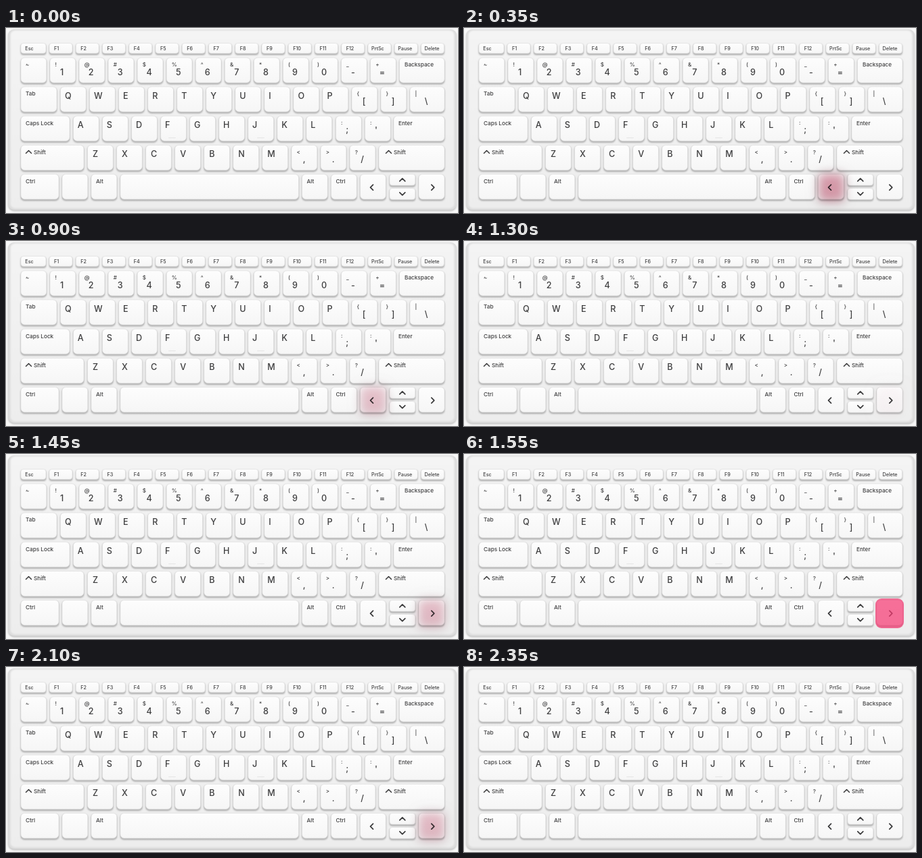
An HTML page for the animation above (2.55 s loop, 668 px wide and 274 px high).

```html
<!DOCTYPE html>
<html lang="en">
<head>
<meta charset="utf-8">
<title>Arrow keys</title>
<style>
  html, body { margin: 0; width: 100%; height: 100%; overflow: hidden; background: #f8f8f8; }
  #stage { position: relative; width: 668px; height: 274px; overflow: hidden; }
  svg { position: absolute; left: 0; top: 0; }
  text { font-family: Inter, "Open Sans", sans-serif; font-weight: 500; fill: #3e3e3f; }
  .chevron { fill: none; stroke: #3a3a3b; stroke-linecap: round; stroke-linejoin: round; }
  .glow, .press { position: absolute; opacity: 0; }
  .glow {
    top: 217px; width: 36px; height: 39px; border-radius: 6px; background: #a91e42;
    box-shadow: 0 0 7px 4px rgba(50, 45, 48, .4); filter: blur(7px); mix-blend-mode: multiply;
  }
  .press { top: 214px; width: 42px; height: 44px; border-radius: 9px; background: #f43a72; }
</style>
</head>
<body>
<div id="stage">
  <svg id="board" width="668" height="274" viewBox="0 0 668 274">
    <defs>
      <linearGradient id="body" x2="0" y2="1">
        <stop offset="0" stop-color="#f4f4f4"/>
        <stop offset="1" stop-color="#ededed"/>
      </linearGradient>
      <linearGradient id="cap" x2="0" y2="1">
        <stop offset="0" stop-color="#fdfdfd"/>
        <stop offset="1" stop-color="#f6f6f6"/>
      </linearGradient>
      <filter id="soft" x="-20%" y="-20%" width="140%" height="150%">
        <feGaussianBlur stdDeviation="0.9"/>
      </filter>
    </defs>
    <rect x="3" y="3" width="663" height="268.5" rx="9" fill="#c6c6c6" filter="url(#soft)"/>
    <rect x="3" y="2" width="663" height="267.5" rx="9" fill="#dcdcdc"/>
    <rect x="6.5" y="3.5" width="656" height="263.5" rx="7" fill="url(#body)" filter="url(#soft)"/>
  </svg>
</div>
<script>
const LOOP = 2550, STEP = 50, PITCH = 43.05, RIGHT = 648;
const stage = document.getElementById('stage');
const board = document.getElementById('board');

function draw(tag, attrs, label) {
  const el = document.createElementNS('http://www.w3.org/2000/svg', tag);
  for (const name in attrs) el.setAttribute(name, attrs[name]);
  if (label) el.textContent = label;
  board.append(el);
}

function cap(x, y, width, height = 37.5) {
  const rx = height < 25 ? 4 : 5.5;
  draw('rect', { x: x - .3, y: y + 1.2, width: width + .6, height: height + .7, rx, fill: '#a9a9a9', filter: 'url(#soft)' });
  draw('rect', { x, y: y + .6, width, height: height + .2, rx, fill: '#c0c0c0' });
  draw('rect', { x, y, width, height: height - .6, rx, fill: 'url(#cap)', stroke: '#dedede', 'stroke-width': .6 });
}

function write(label, x, y, size, anchor = 'start') {
  draw('text', { x, y, 'font-size': size, 'text-anchor': anchor }, label);
}

function chevron(d, width = 1.7) {
  draw('path', { d, class: 'chevron', 'stroke-width': width });
}

function wordKey(label, x, y, width, shift = 7) {
  cap(x, y, width);
  write(label, x + shift, y + 13.4, 8.2);
}

function letterKeys(letters, x, y, shift) {
  [...letters].forEach((letter, i) => {
    cap(x + i * PITCH, y, 37.8);
    write(letter, x + i * PITCH + shift, y + 17.6, 12.6);
  });
}

function pairKey(upper, lower, x, y, dy, width = 37.8, dx = 17.5) {
  cap(x, y, width);
  write(upper, x + 7.6, y + 13, 8);
  write(lower, x + dx, y + dy, 12.6, 'middle');
}

function shiftKey(x, width, shift) {
  cap(x, 173.5, width);
  chevron(`M${x + shift} 185.5l4 -4 4 4`, 1.5);
  write('Shift', x + shift + 11.5, 186.9, 8.2);
}

// Function row
cap(22, 22.5, 37, 15.5);
write('Esc', 28.3, 32.8, 7.2);
const fnLabels = Array.from({ length: 12 }, (_, i) => 'F' + (i + 1)).concat('PrtSc', 'Pause', 'Delete');
fnLabels.forEach((label, i) => {
  const x = 64 + 39.25 * i;
  cap(x, 22.5, 34, 15.5);
  write(label, x + (i < 12 ? 6.9 : 5), 32.8, 7.2);
});

// Number row
cap(22, 44, 37.8);
write('~', 29, 57, 8);
[...'!@#$%^&*()_+'].forEach((upper, i) =>
  pairKey(upper, '1234567890-='[i], 65 + i * PITCH, 44, 26));
wordKey('Backspace', 581.5, 44, RIGHT - 581.5, 7.5);

// Letter rows
wordKey('Tab', 22, 87, 53);
letterKeys('QWERTYUIOP', 80.5, 87, 6.5);
pairKey('{', '[', 511, 87, 26, 37.8, 18);
pairKey('}', ']', 554, 87, 26, 37.8, 18);
pairKey('|', '\\', 597, 87, 26, RIGHT - 597, 24);

wordKey('Caps Lock', 22, 130.3, 72);
letterKeys('ASDFGHJKL', 99.5, 130.3, 6.3);
for (const x of [240, 371]) draw('rect', { x, y: 162, width: 11, height: 1.2, rx: .6, fill: '#e8e8e8' });
pairKey(':', ';', 487.5, 130.3, 25, 37.8, 16.8);
pairKey(':', "'", 530.5, 130.3, 25.5, 37.8, 16.5);
wordKey('Enter', 573, 130.3, RIGHT - 573);

shiftKey(22, 93, 7.5);
letterKeys('ZXCVBNM', 120.5, 173.5, 7.5);
['<,', '>.', '?/'].forEach(([upper, lower], i) =>
  pairKey(upper, lower, 422 + i * PITCH, 173.5, 25, 37.8, 18.6));
shiftKey(551, RIGHT - 551, 10.5);

// Bottom row
wordKey('Ctrl', 22, 216.5, 56);
cap(83, 216.5, 37.8);
wordKey('Alt', 126, 216.5, 37.8);
cap(169, 216.5, 263.5);
wordKey('Alt', 437.5, 216.5, 37.8);
wordKey('Ctrl', 480.5, 216.5, 37.8);
cap(523.5, 216.5, 37.8);
cap(567, 216.5, 37.8, 17);
cap(567, 237.5, 37.8, 17);
cap(610, 216.5, 38);
chevron('M542.5 232.2l-4 4 4 4');
chevron('M628.8 232.2l4 4 -4 4');
chevron('M581.8 226.8l4 -4 4 4');
chevron('M581.8 243.7l4 4 4 -4');

// Each press: soft glow in, solid hold, soft glow out
const presses = [
  { x: 542.5, rise: 0, down: 400, up: 700, fade: 650, end: 1150 },
  { x: 629, rise: 1250, down: 1550, up: 1950, fade: 1900, end: 2350 }
];

function layer(name, left) {
  const el = document.createElement('div');
  el.className = name;
  el.style.left = left + 'px';
  stage.append(el);
  return el;
}

for (const p of presses) {
  p.glow = layer('glow', p.x - 18);
  p.solid = layer('press', p.x - 21);
}

function glowLevel(p, t) {
  if (t > p.rise && t < p.down) return ((t - p.rise) / (p.down - p.rise)) ** 1.5;
  if (t >= p.up && t < p.end) return 1 - (t - p.fade) / (p.end - p.fade);
  return 0;
}

function frame(now) {
  const t = Math.floor(now % LOOP / STEP) * STEP;
  for (const p of presses) {
    p.glow.style.opacity = .54 * glowLevel(p, t);
    p.solid.style.opacity = t >= p.down && t < p.up ? .72 : 0;
  }
}

const start = performance.now();
function tick() {
  frame(performance.now() - start);
  requestAnimationFrame(tick);
}
tick();
</script>
</body>
</html>
```
